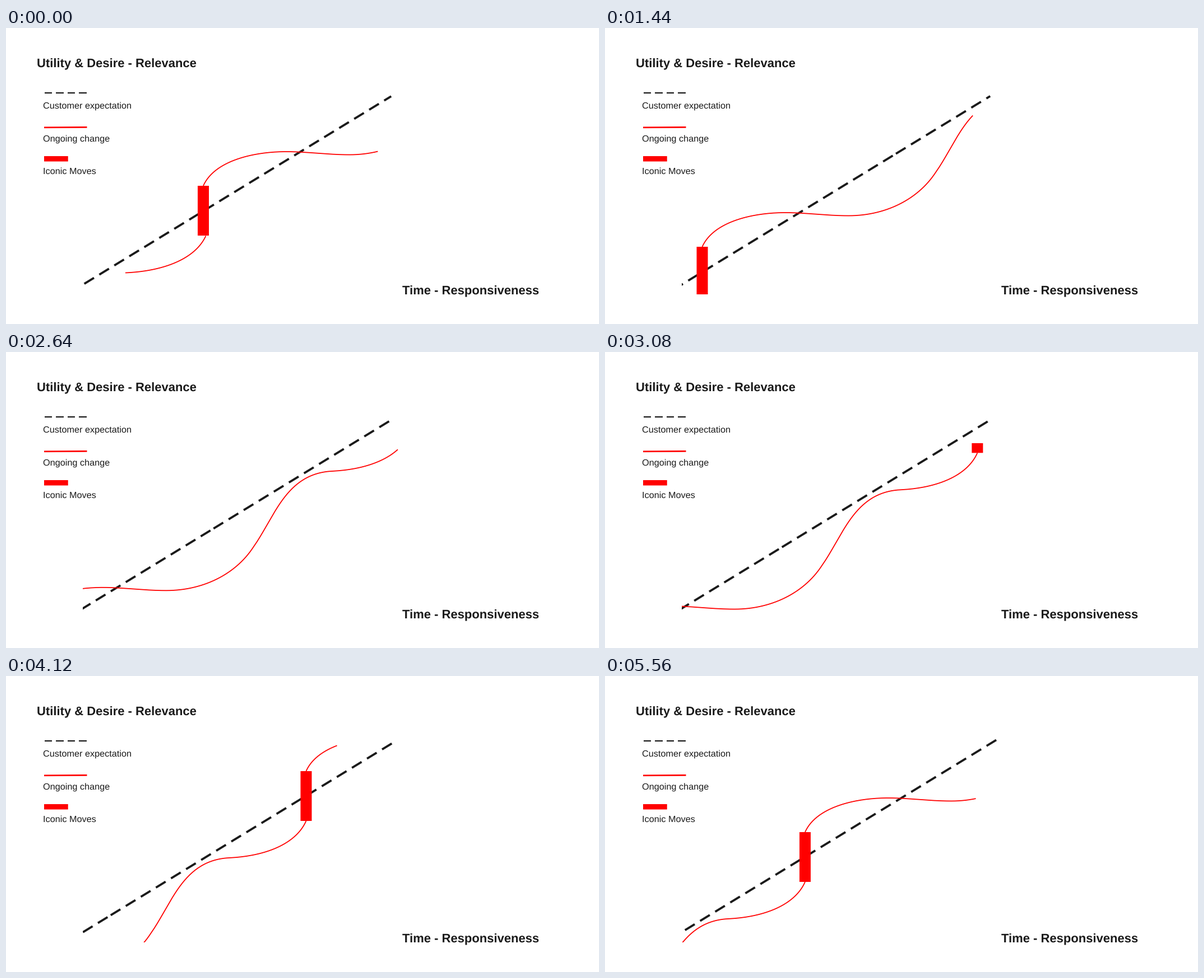
Animation of 1058 by 529 pixels, one loop 5.6 s. Source, as a matplotlib script:

```python
import numpy as np
import matplotlib.pyplot as plt
from matplotlib.animation import FuncAnimation
from matplotlib.collections import LineCollection
from matplotlib.patches import Rectangle

plt.rcParams["font.family"] = "Liberation Sans"
plt.rcParams["text.hinting"] = "none"

W, H, DPI = 1058, 529, 100
LOOP, STEP = 5600, 40
INK, RED = "#1a1a1a", "#ff0000"
PT = 72 / DPI                      # points per pixel
SHIFT = np.array([694.2, -423.8])  # distance from one cycle to the next
BAR = np.array([342.0, 282.0])     # top left corner of the first bar
BAR_W, BAR_H = 20, 89
BAR_START, BAR_END = 2835, 3700    # the next bar grows between these times

fig = plt.figure(figsize=(W / DPI, H / DPI), dpi=DPI, facecolor="white")
ax = fig.add_axes([0, 0, 1, 1])
ax.set_xlim(0, W)
ax.set_ylim(H, 0)
ax.axis("off")


def bezier(*pts, n=60):
    p0, p1, p2, p3 = np.array(pts, float)
    u = np.linspace(0, 1, n)[:, None]
    v = 1 - u
    return v**3 * p0 + 3 * v * v * u * p1 + 3 * v * u * u * p2 + u**3 * p3


# Curves are measured from the bar's top left corner.
lower = bezier((-128, 155), (-62, 152), (-8, 130), (10, 89))
first_lower = lower * (1.04, 1) + (4.1, 0.5)
upper = np.vstack([
    bezier((10, 0), (30, -45), (100, -61), (158, -61)),
    bezier((158, -61), (195, -61), (230, -55.5), (271, -55.5)),
    bezier((271, -55.5), (335, -55.5), (393, -83), (425.5, -131.5)),
    bezier((425.5, -131.5), (465, -187), (484, -264), (566.2, -268.8)),
])
route = np.vstack([upper, lower + SHIFT])
arc = np.r_[0, np.cumsum(np.hypot(*np.diff(route, axis=0).T))]


def drawn(t):
    """Part of the route the pen has drawn by time t, at constant speed."""
    s = arc[-1] * np.clip((t - BAR_END) / (LOOP + BAR_START - BAR_END), 0, 1)
    tip = [np.interp(s, arc, route[:, k]) for k in (0, 1)]
    return np.vstack([route[arc < s], tip])


def dashes(start, stop, period, tip, length=17.3):
    xs = np.arange(start, min(stop, tip), period)
    ends = np.minimum(xs + length, tip)
    y = lambda x: 457.3 - 0.612 * (x - 139.4)
    return [[(a, y(a)), (b, y(b))] for a, b in zip(xs, ends)]


def label(x, y, s, size, weight="normal"):
    ax.text(x, y, s, fontsize=size * PT, weight=weight, color=INK,
            ha="left", va="baseline")


label(55.3, 70, "Utility & Desire - Relevance", 22, "bold")
label(706.8, 476, "Time - Responsiveness", 22.05, "bold")
for row, name in enumerate(["Customer expectation", "Ongoing change",
                            "Iconic Moves"]):
    label(65.8, 143.8 + 58.4 * row, name, 16.2)

ax.add_collection(LineCollection(
    [[(x, 116.2), (x + 13.5, 116.2)] for x in 68.7 + 20.45 * np.arange(4)],
    colors=INK, linewidths=2.2 * PT, capstyle="butt"))
ax.plot([68, 144.5], [177.8, 177.3], color=RED, lw=2.7 * PT,
        solid_capstyle="butt")
ax.add_patch(Rectangle((68, 229), 42.7, 9.5, color=RED, lw=0, snap=False))

window = Rectangle((137, 0), W - 137, 476, transform=ax.transData)


def clipped(artist):
    artist.set_clip_path(window)
    return artist


line = LineCollection([], colors=INK, linewidths=3.8 * PT, capstyle="butt",
                      zorder=3)
ax.add_collection(line)
clipped(line)
curves = [clipped(ax.plot([], [], color=RED, lw=1.8 * PT, zorder=4,
                          solid_capstyle="butt")[0]) for _ in range(3)]
bars = [clipped(ax.add_patch(Rectangle((0, 0), BAR_W, 0, color=RED, lw=0,
                                       snap=False, zorder=5)))
        for _ in range(2)]


def update(i):
    t = i * STEP
    move = -SHIFT * t / LOOP
    home = BAR + move
    following = home + SHIFT

    # The dashed line's end rests, then creeps right.
    tip = 687.2 + 0.0036 * max(0, t - 2160) - move[0]
    segs = dashes(139.7, 690, 26.75, tip) + dashes(697.5, 1400, 26.9, tip)
    line.set_segments([np.array(s) + move for s in segs])

    parts = [home + first_lower, home + drawn(t + LOOP), following + drawn(t)]
    for curve, pts in zip(curves, parts):
        curve.set_data(pts[:, 0], pts[:, 1])

    u = np.clip((t - BAR_START) / (BAR_END - BAR_START), 0, 1)
    grown = BAR_H * u * u * (3 - 2 * u)
    for bar, corner, h in zip(bars, (home, following), (BAR_H, grown)):
        bar.set_xy((corner[0], corner[1] + BAR_H - h))
        bar.set_height(h)
    return [line, *curves, *bars]


anim = FuncAnimation(fig, update, frames=LOOP // STEP, interval=STEP,
                     repeat=True, repeat_delay=0, blit=False)
plt.show()
```
